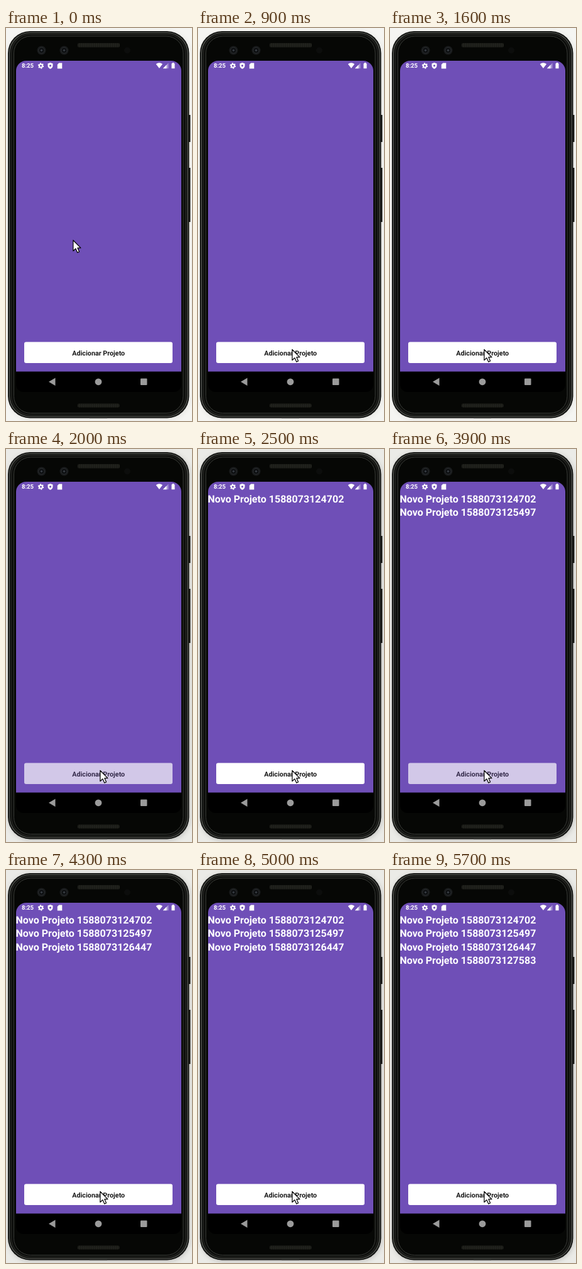
These frames come from a looping animation (296 by 624 pixels, 5900 ms). An HTML page:

```html
<!DOCTYPE html>
<html lang="pt">
<head>
<meta charset="utf-8">
<style>
html, body { margin: 0; width: 100%; height: 100%; overflow: hidden; background: #f3f3f0; }
svg { display: block; width: 296px; height: 624px; font-family: Roboto, sans-serif; text-rendering: geometricPrecision; }
</style>
</head>
<body>
<svg viewBox="0 0 296 624">
  <defs>
    <pattern id="mesh" width="3" height="3" patternUnits="userSpaceOnUse">
      <rect width="3" height="3" fill="#242520"/>
      <circle cx="1.5" cy="1.5" r=".9" fill="#10110e"/>
    </pattern>
    <filter id="soft" x="-20%" y="-20%" width="140%" height="140%">
      <feGaussianBlur stdDeviation="4"/>
    </filter>
    <g id="camera">
      <circle r="7" fill="#191b1c"/>
      <circle r="4.5" fill="#0c0e10" stroke="#2b2e30"/>
      <circle r="1.8" fill="#33383e"/>
    </g>
  </defs>
  <rect id="wall" width="296" height="624"/>
  <rect id="shadow" x="5" y="7" width="287" height="614" rx="35" fill="#333" filter="url(#soft)"/>

  <!-- phone -->
  <path d="M290 138h3.4v43h-3.4zM290 222h3.4v86h-3.4z" fill="#161715"/>
  <rect x="3" y="5" width="288.5" height="614.5" rx="35" fill="#141513"/>
  <rect x="5.5" y="7.5" width="283.5" height="609.5" rx="33" fill="#0b0c0a" stroke="#5c5e59" stroke-width="1.2"/>
  <rect x="8.5" y="10" width="277.5" height="604.5" rx="30" fill="none" stroke="#1f201d" stroke-width="2"/>
  <rect x="12.5" y="13" width="269.5" height="598.5" rx="27" fill="#060705" stroke="#383a36"/>
  <path d="M133 619h28" stroke="#3a3b38"/>
  <rect x="114" y="24" width="67" height="6.5" rx="2" fill="url(#mesh)"/>
  <rect x="114" y="596.5" width="66.5" height="6" rx="2" fill="url(#mesh)"/>
  <use href="#camera" x="56.5" y="35.5"/>
  <use href="#camera" x="92.5" y="35.5"/>
  <circle cx="193" cy="35.5" r="5" fill="#0c0d0c"/>

  <!-- screen -->
  <path d="M16 545H279V566a12 12 0 0 1-12 12H28a12 12 0 0 1-12-12z"/>
  <path d="M16 545.5V68a16 16 0 0 1 16-16H263a16 16 0 0 1 16 16V545.5z" fill="#6f4fb7"/>
  <g fill="#fff">
    <text x="24.9" y="63.3" font-size="9.6" font-weight="700">8:25</text>
    <circle cx="55.5" cy="60" r="2.6" fill="none" stroke="#fff" stroke-width="2"/>
    <circle cx="55.5" cy="60" r="4" fill="none" stroke="#fff" stroke-width="1.4" stroke-dasharray="2.1 2.09"/>
    <path d="M70.5 55l4 1.6v3.2q0 3.6-4 5.2q-4-1.6-4-5.2v-3.2z"/>
    <circle cx="70.5" cy="59.8" r="1.6" fill="#6f4fb7"/>
    <path d="M84.3 55.5h5v9h-7.5v-6.4z"/>
    <path d="M238.7 57.2q5.2-3.8 10.4 0l-5.2 6.8z"/>
    <path d="M258.5 55.5v8.7h-8.7z" opacity=".4"/>
    <path d="M255.5 58.5v5.7h-5.7z"/>
    <path d="M263.5 56.3h1.3v-1.2h2.4v1.2h1.3v8h-5z"/>
  </g>
  <g id="list" fill="#fff" font-size="16.05" font-weight="700"></g>
  <g id="button">
    <rect x="29" y="498.5" width="236" height="33.5" rx="3" fill="#fff"/>
    <text x="147.2" y="519.6" font-size="10.75" font-weight="700" text-anchor="middle" fill="#1a1a1a">Adicionar Projeto</text>
  </g>
  <g fill="#9b9b9b">
    <path d="M68 561.8l10.5-6.2v12.4z"/>
    <circle cx="147" cy="561.8" r="5.4"/>
    <rect x="214" y="556.5" width="10.5" height="10.5" rx="1"/>
  </g>
  <path id="cursor" d="M0 0V17L4 13.3L6.8 19.6L9.7 18.3L7 12.2H12Z" fill="#fff" stroke="#000" stroke-width="1.2" stroke-linejoin="round"/>
</svg>
<script>
const LOOP = 5900, STEP = 100;
const $ = id => document.getElementById(id);

// each tap: finger down, finger up, timestamp of the added project
const taps = [
  [1900, 2100, 1588073124702],
  [2500, 2700, 1588073125497],
  [3800, 4000, 1588073126447],
  [5000, 5150, 1588073127583]
];

const rows = taps.map(([, , stamp], i) => {
  const row = document.createElementNS('http://www.w3.org/2000/svg', 'text');
  row.setAttribute('x', 15.4);
  row.setAttribute('y', 84.8 + 21.45 * i);
  row.textContent = 'Novo Projeto ' + stamp;
  return $('list').appendChild(row);
});

const ease = (t, start, length) => {
  const p = Math.min(1, Math.max(0, (t - start) / length));
  return p < .5 ? 2 * p * p : 1 - 2 * (1 - p) ** 2;
};

function draw(t) {
  let dim = 0;
  taps.forEach(([down, up], i) => {
    dim += ease(Math.min(t, up), down, 150) * (1 - ease(t, up, 250));
    rows[i].setAttribute('visibility', t >= up ? 'visible' : 'hidden');
  });
  $('button').setAttribute('opacity', 1 - .4 * dim);
  const move = ease(t, 150, 600);
  $('cursor').setAttribute('transform', `translate(${106.9 + 43 * move} ${337 + 173.5 * move})`);
  const dusk = t >= 1800;
  $('wall').setAttribute('fill', dusk ? '#ebebe7' : '#f5f5f2');
  $('shadow').setAttribute('opacity', dusk ? .25 : .1);
}

function frame() {
  const t = performance.now() % LOOP;
  draw(Math.floor(t / STEP) * STEP);
  requestAnimationFrame(frame);
}
frame();
</script>
</body>
</html>
```
